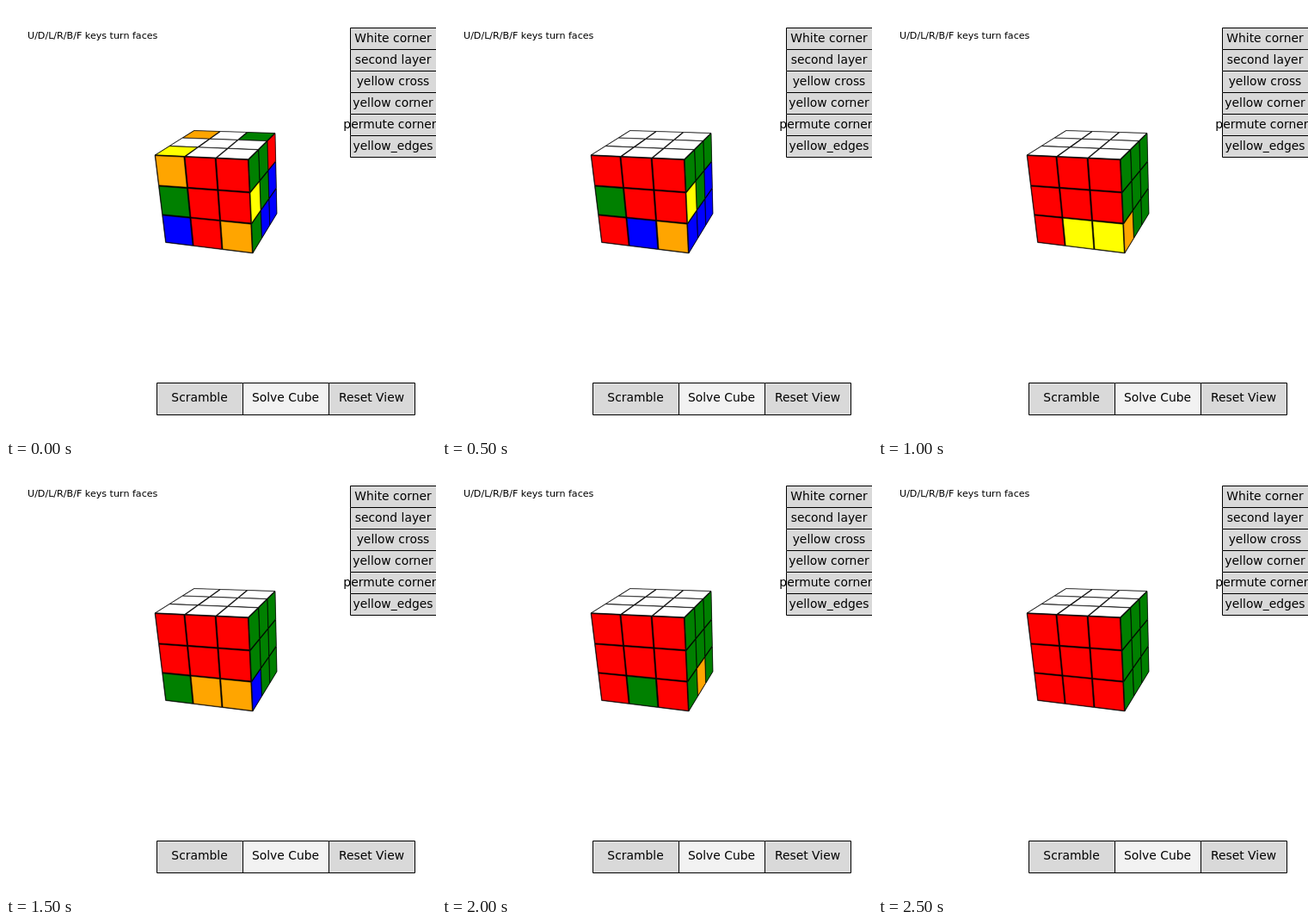
An HTML page with a canvas that plays this animation: 500 by 499 pixels, repeating every 3000 ms.

```html
<!DOCTYPE html>
<html lang="en">
<head>
<meta charset="utf-8">
<title>Cube solver</title>
<style>
  html, body { margin: 0; width: 100%; height: 100%; overflow: hidden; background: #fff; }
  canvas { display: block; }
</style>
</head>
<body>
<canvas id="stage" width="500" height="499"></canvas>
<script>
const ctx = document.getElementById('stage').getContext('2d');
const STEP = 500;
const COLORS = { W: '#fff', R: '#f00', G: '#008000', B: '#00f', O: '#ffa500', Y: '#ff0' };

// Visible cube corners: front a-b-c-d, right side b-e-f-c, top g-e-b-a.
const a = [173, 173], b = [282, 178], c = [287, 287], d = [185.5, 274.5];
const e = [313, 147.5], f = [315, 241], g = [218.5, 144.5];
const FACES = [[g, e, b, a], [a, b, c, d], [b, e, f, c]];

// Stickers per solving stage: top, front, right, each row by row.
const STATES = [
  ['OWGWWWYWW', 'ORRGRRBRO', 'GGRYGBGBB'],
  ['WWWWWWWWW', 'RRRGRRRBO', 'GGGYGBBBB'],
  ['WWWWWWWWW', 'RRRRRRRYY', 'GGGGGGOGG'],
  ['WWWWWWWWW', 'RRRRRRGOO', 'GGGGGGBGG'],
  ['WWWWWWWWW', 'RRRRRRRGR', 'GGGGGGGOG'],
  ['WWWWWWWWW', 'RRRRRRRRR', 'GGGGGGGGG']
];

// Perspective map from the unit square to a quad.
function projector([[x0, y0], [x1, y1], [x2, y2], [x3, y3]]) {
  const ux = x1 - x2, uy = y1 - y2, vx = x3 - x2, vy = y3 - y2;
  const sx = x0 - x1 + x2 - x3, sy = y0 - y1 + y2 - y3;
  const det = ux * vy - vx * uy;
  const p = (sx * vy - vx * sy) / det, q = (ux * sy - sx * uy) / det;
  return (u, v) => {
    const w = 1 + p * u + q * v;
    return [
      (x0 + (x1 - x0 + p * x1) * u + (x3 - x0 + q * x3) * v) / w,
      (y0 + (y1 - y0 + p * y1) * u + (y3 - y0 + q * y3) * v) / w
    ];
  };
}
const PROJECTORS = FACES.map(projector);

function polygon(points, fill) {
  ctx.beginPath();
  points.forEach(([x, y]) => ctx.lineTo(x, y));
  ctx.closePath();
  ctx.fillStyle = fill;
  ctx.fill();
  ctx.stroke();
}

function drawFace(index, stickers) {
  const project = PROJECTORS[index], inset = 0.02;
  ctx.lineWidth = 0.5;
  polygon(FACES[index], '#000');
  [...stickers].forEach((key, i) => {
    const col = i % 3, row = Math.floor(i / 3);
    const l = (col + inset) / 3, r = (col + 1 - inset) / 3;
    const t = (row + inset) / 3, m = (row + 1 - inset) / 3;
    polygon([project(l, t), project(r, t), project(r, m), project(l, m)], COLORS[key]);
  });
}

function button(label, x, y, height, baseline, fill = '#d9d9d9') {
  ctx.lineWidth = 1;
  ctx.fillStyle = fill;
  ctx.fillRect(x, y, 100, height);
  ctx.strokeRect(x + 0.5, y + 0.5, 100, height);
  ctx.fillStyle = '#000';
  ctx.font = '13.89px "DejaVu Sans", sans-serif';
  ctx.textAlign = 'center';
  ctx.fillText(label, x + 50, y + baseline);
}

function draw(time) {
  ctx.fillStyle = '#fff';
  ctx.fillRect(0, 0, 500, 499);
  ctx.strokeStyle = '#000';
  ctx.lineJoin = 'round';

  ctx.fillStyle = '#000';
  ctx.font = '11.11px "DejaVu Sans", sans-serif';
  ctx.textAlign = 'left';
  ctx.fillText('U/D/L/R/B/F keys turn faces', 25, 38);

  ['White corner', 'second layer', 'yellow cross', 'yellow corner', 'permute corners', 'yellow_edges']
    .forEach((label, i) => button(label, 400, 25 + 25 * i, 25, 17));
  button('Scramble', 175, 437, 37, 22);
  button('Solve Cube', 275, 437, 37, 22, '#f2f2f2');
  button('Reset View', 375, 437, 37, 22);

  STATES[Math.floor(time / STEP) % STATES.length].forEach((stickers, i) => drawFace(i, stickers));
}

const start = performance.now();
function tick() {
  draw(performance.now() - start);
  requestAnimationFrame(tick);
}
tick();
</script>
</body>
</html>
```
